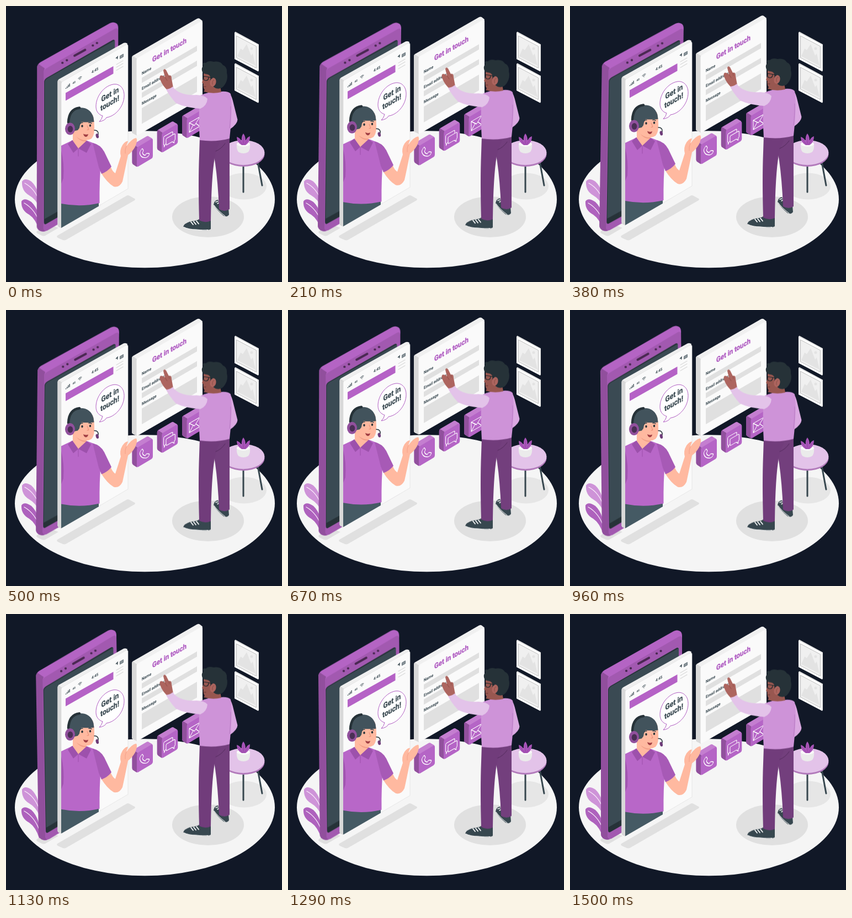
Recreate the animation shown at these times as an HTML page. Size 500 by 500 pixels, loop 1.54 s.

```html
<!DOCTYPE html>
<html lang="en">
<head>
<meta charset="utf-8">
<title>Get in touch</title>
<style>
  html, body { margin: 0; width: 100%; height: 100%; overflow: hidden; background: #111827; }
  svg { display: block; width: 100%; height: 100%; }
  text { font-family: Roboto, Arial, sans-serif; font-weight: 700; fill: #37474f; }
  .float { animation: float 1540ms linear -40ms infinite; }
  .wind { animation: wind 1540ms linear -40ms infinite; transform-origin: 130px 220px; }
  .line { fill: none; stroke-linecap: round; stroke-linejoin: round; }
  @keyframes float {
    0%, 100% { transform: translateY(.5px); }
    50% { transform: translateY(-9.5px); }
  }
  @keyframes wind {
    0%, 100% { transform: rotate(0deg); }
    25% { transform: rotate(1deg); }
    75% { transform: rotate(-1deg); }
  }
</style>
</head>
<body>
<svg viewBox="0 0 500 500">
  <defs>
    <g id="picture">
      <path d="M414 48l1.500-1.500L458 69.500V117l-1 1.500-43-22.500z" fill="#e0e0e0"/>
      <path d="M414 48l43 22.500v48L414 96z" fill="#fff"/>
      <path d="M417.500 54l36 19v39.500l-36-19z" fill="#f0f0f0" stroke="#a6a6a6" stroke-width=".7"/>
      <path d="M419 91l6-14 4 3 7-11 8 21 3-4 5 22z" fill="#e3e3e3"/>
      <circle cx="445" cy="77" r="2.500" fill="#e3e3e3"/>
    </g>
    <g id="tile">
      <path d="M228.500 254.500q0-3 2.500-4.500L254 236.500q3-2 5 0l6 3.500-28 51-6-3.500q-2.500-1.500-2.500-4z" fill="#c47ed0"/>
      <path d="M228.500 254.500q0-3 1.500-4l8 5-1 36-6-4q-2.500-1.500-2.500-4z" fill="#91509d"/>
      <path d="M237 259.500q0-3 2.500-4.500L263 241q3-1.500 3 2V272q0 3-2.500 4.500L240 290.500q-3 2-3-1.500z" fill="#b565c6"/>
    </g>
    <clipPath id="screen"><path d="M100 138L221 68V332L100 402z"/></clipPath>
  </defs>

  <rect width="500" height="500" fill="#111827"/>
  <ellipse cx="251.500" cy="350.300" rx="235.500" ry="124" fill="#f5f5f5"/>
  <g fill="#e0e0e0">
    <path d="M56 408q-2 2 1 4l8 4q3 1 6 0l24-14-20-8z"/>
    <path d="M93 416q-2 2 1 4l9 4q3 1 6-.5L233 352q2-2 0-3l-9-5q-3-2-6 0z"/>
    <ellipse cx="366" cy="382" rx="65" ry="37"/>
    <ellipse cx="431" cy="326.500" rx="41" ry="24" fill="#e6e6e6"/>
  </g>

  <use href="#picture"/>
  <use href="#picture" y="57"/>

  <!-- plant -->
  <path d="M62 364Q61 332 46 318Q34 310 29 318Q28 335 42 343Q54 350 60 364z" fill="#ce93d8"/>
  <path d="M63 406Q62 370 46 355Q33 346 28 354Q27 370 42 378Q54 386 60 406z" fill="#ae62bd"/>
  <path class="line" d="M34 321Q53 331 61 356M33 357Q53 368 62 396" stroke="#faf0fb" stroke-width="1.200"/>

  <!-- table -->
  <path class="line" d="M430 288V337M456 282L464 325" stroke="#37474f" stroke-width="3"/>
  <ellipse cx="430" cy="268.500" rx="38.500" ry="22.500" fill="#b27abb"/>
  <ellipse cx="430" cy="265.500" rx="38.500" ry="22.500" fill="#e3c3e9"/>
  <path d="M418 250q-1 11 4 15 8 4 16 0 5-4 4-15z" fill="#ebebeb"/>
  <ellipse cx="430" cy="250" rx="12" ry="4.500" fill="#fafafa"/>
  <path d="M427 252Q418 247 418 237Q424 239 427 245Q426 236 430 231Q434 236 434 244Q437 237 442 236Q442 247 434 252z" fill="#a954b9"/>
  <path class="line" d="M430 251V237M428 251L421 241M432 251L439 241" stroke="#8b4698" stroke-width=".7"/>

  <!-- phone -->
  <g class="wind">
    <path d="M56 113Q56 106 62 102L188 31Q194 28 199 31Q203 33 203 40V332L72 408Q66 410 61 407Q56 404 56 398z" fill="#b464c4"/>
    <path d="M56 113Q56 108 59 105.500L70 113Q68 117 68 122V400Q68 406 72 408Q66 410 61 407Q56 404 56 398z" fill="#914f9d"/>
    <path d="M68 122Q68 116 73 113L197 41Q203 38 203 46V332L75 407Q68 409 68 400z" fill="#a259b0"/>
    <path d="M69 138Q69 133 74 130L192 62Q197 59 197 65V324L73 395Q69 397 69 391z" fill="#263238"/>
    <path d="M70 139Q70 134 75 131L197 62V314L70 386z" fill="#3a4a53"/>
    <g class="line" stroke="#4a2852" stroke-width="4.200">
      <path d="M102 103h.1M110 98.300h.1M124 90L143 79.500M157 71.500h.1M164.500 67h.1"/>
    </g>
  </g>

  <!-- contact form -->
  <g class="float">
    <path d="M228 94q0-3 2.500-4.500L346 23q3-1.500 5 0l5 4-119 207-7-3q-2-1-2-3z" fill="#f0f0f0"/>
    <path d="M228 94q0-2.500 1.500-4l8.500 6-1 138.500-7-3.500q-2-1-2-3z" fill="#d9d9d9"/>
    <path d="M236.500 98q0-2.500 2-4L353 28q3-1.500 3 2V164q0 2-2 3.500L239.500 233.500q-3 1.500-3-1.500z" fill="#fafafa"/>
    <g fill="#e0e0e0">
      <path d="M246 130l100-58v9.500l-100 58z"/>
      <path d="M246 157l100-58v9.500l-100 58z"/>
      <path d="M246 185l100-58v28.500l-100 58z"/>
    </g>
    <text transform="matrix(.866 -.5 0 1 265 102)" font-size="13.200" style="fill:#b05cc2;stroke:#b05cc2;stroke-width:.35">Get in touch</text>
    <g font-size="7.500">
      <text transform="matrix(.866 -.5 0 1 246 125)">Name</text>
      <text transform="matrix(.866 -.5 0 1 246 152.500)">Email address</text>
      <text transform="matrix(.866 -.5 0 1 246 179.500)">Message</text>
    </g>

    <use href="#tile"/>
    <use href="#tile" x="45.300" y="-26.200"/>
    <use href="#tile" x="90.500" y="-52.300"/>
    <g class="line" stroke="#fff" stroke-width="1.200">
      <path transform="matrix(.866 -.5 0 1 251.500 266)" d="M-8-9q-3 2-2.500 5Q-8 6 3 10q4 1 6-2 1-2-1-3l-4-2q-2 0-3 2Q-4 2-5-3q2-1 2-3l-2-4q-1-1-3 1z"/>
      <g transform="matrix(.866 -.5 0 1 296 241)">
        <path d="M-7 5l-1 0 -3 4V5q-1 0-1-2V-8q0-2 2-2H5q2 0 2 2v3"/>
        <path d="M-5-4H10q2 0 2 2V6q0 2-2 2v4L6 8H-5q-2 0-2-2V-2q0-2 2-2z"/>
      </g>
      <path transform="matrix(.866 -.5 0 1 341.500 214.500)" d="M-11-8H11V9H-11zL0 2 11-8M-11 9L-3 0M11 9L3 0"/>
    </g>
  </g>

  <!-- front screen -->
  <g class="float">
    <path d="M93.500 137q0-3 2.500-4.500L213 67q4-1.500 7 1l-119 334-5-2q-2.500-1-2.500-3z" fill="#efefef"/>
    <path d="M93.500 137q0-2.500 1.500-3.500l6.500 4-1.500 265-4-2q-2.500-1-2.500-3z" fill="#d9d9d9"/>
    <path d="M100 141q0-2.500 2-4L217 70.500q4-2 4 2V331L100 402z" fill="#fafafa" stroke="#dcdcdc" stroke-width=".6"/>

    <g class="line" stroke="#37474f" stroke-width="1.300">
      <path d="M108.500 150v-1.500M110.700 148.700v-3M112.900 147.400v-4.500M115.100 146v-5.500" stroke-linecap="butt"/>
      <path d="M131 131.500q3-4.500 6-3.500M132.300 132.500q2-2.500 3.500-2M134 133.500h.1" stroke-width="1"/>
    </g>
    <path d="M198 95l5-5-1 7-1.500-2.500z" fill="#37474f"/>
    <path d="M206.500 90.500l6-3.500v5l-6 3.500z" fill="#8a949a" stroke="#37474f" stroke-width=".6"/>
    <text transform="matrix(.866 -.5 0 1 120.500 142)" font-size="5">4G</text>
    <text transform="matrix(.866 -.5 0 1 155 122.500)" font-size="7">4:45</text>
    <path class="line" d="M200 106l12-7M200 111l12-7M200 116.500l12-7" stroke="#dadada" stroke-width="1.300"/>
    <path d="M108 157.500L194.500 109v13.500L108 171.500z" fill="#b562c6"/>

    <path d="M175 199Q174 205 169 209.500Q179 208 182 202C198 200 214 182 214 162C214 148 205 140 194 142C177 145 163 164 163 182C163 191 168 197 175 199z" fill="#fff" stroke="#b05cc2" stroke-width="1"/>
    <g font-size="14" stroke="#37474f" stroke-width=".25">
      <text transform="matrix(.866 -.5 0 1 172.500 174)">Get in</text>
      <text transform="matrix(.866 -.5 0 1 171 190.500)">touch!</text>
    </g>

    <!-- operator -->
    <g clip-path="url(#screen)">
      <path d="M100 354H168V402H100z" fill="#455a64"/>
      <path d="M100 253L121 243L133 254L147 244L160 249Q173 255 172 285Q169 315 169.500 357Q135 365 100 358z" fill="#b867c8"/>
      <path d="M100 262Q106 285 104 312L100 322z" fill="#a155b0"/>
    </g>
    <path d="M172 302L190 292Q193 300 198 303L208 272Q205 262 211 252Q217 244 221 245L218 254Q228 240 236 239Q239 243 234 255Q229 264 221 270Q215 300 211 318Q205 330 195 327Q183 320 172 302z" fill="#ffb9a0"/>
    <path class="line" d="M218 254Q215 260 216 267" stroke="#ee957e" stroke-width=".7"/>
    <path d="M157 248Q171 251 178 264L191 291Q184 300 173 304L168 292z" fill="#a75ab6"/>
    <path d="M121 224V244L131 259L146 246L145 236z" fill="#ffb9a0"/>
    <path d="M127 236Q136 244 146 243L146 245Q135 247 127 236z" fill="#f29f88"/>
    <path d="M122 195L157 197Q160 206 160 218Q161 233 155 240Q148 245 138 242Q127 239 122 230z" fill="#ffb9a0"/>
    <path d="M120 243L112 250L122 266L131 258zM146 244L131 258L146 266L154 250z" fill="#9d51ac"/>
    <path class="line" d="M131 259V272" stroke="#9d51ac" stroke-width="1"/>
    <path d="M113 211Q111 189 128 185Q152 181 158.500 202L159.500 210Q147 211 137 210Q134 213 133 221L130 225L121 227z" fill="#42535c"/>
    <path class="line" d="M113 211Q114 187 133 184.500" stroke="#263238" stroke-width="4.500"/>
    <ellipse cx="116" cy="222.500" rx="9" ry="11" fill="#91509d"/>
    <ellipse cx="116.500" cy="223" rx="4.800" ry="6" fill="#4a2f55"/>
    <g fill="#263238">
      <ellipse cx="138" cy="217.500" rx="1.700" ry="2.200"/>
      <ellipse cx="152.500" cy="216.500" rx="1.700" ry="2.200"/>
    </g>
    <path class="line" d="M134 213.500q3-3 5-2M150 211.500q3-1 5 1" stroke="#37474f" stroke-width="1.500"/>
    <path class="line" d="M147 217l3 7-3 .5" stroke="#e98b73" stroke-width="1"/>
    <path d="M140 231.500Q144 234 149 232Q148 237.500 144 237Q141 236 140 231.500z" fill="#a23f44"/>
    <path class="line" d="M160 225Q168 225 167 233" stroke="#263238" stroke-width="1.500"/>
    <ellipse cx="165.200" cy="235.500" rx="2.600" ry="4.200" transform="rotate(-15 165 235)" fill="#6e3c79"/>
  </g>

  <!-- visitor -->
  <g class="float">
    <path d="M384 351Q377 352 376 360Q382 370 394 380Q401 383 404 378L403 366L387 358z" fill="#37474f"/>
    <path class="line" d="M377 361Q384 371 397 380.500" stroke="#fff" stroke-width="1"/>
    <path class="line" d="M380 355l4-1M383 358l4-2" stroke="#fff" stroke-width="1.500"/>
    <path d="M350 386Q346 389 335 390Q322 394 321 400Q330 405 345 405Q365 408 371 404L371 388z" fill="#37474f"/>
    <path class="line" d="M322 400.500Q331 405 345 405Q358 406.500 366 405.500" stroke="#fff" stroke-width="1"/>
    <path class="line" d="M335 391l4 5M340 390.500l4 5M345 389.500l4 5" stroke="#fff" stroke-width="1.800"/>
    <path d="M372 243L405 238Q405 270 405 368Q396 374 386 368Q384 320 379 285z" fill="#733f7d"/>
    <path d="M351 240L388 245Q381 258 378 275Q372 310 371 389Q360 394 350 388Q348 320 350 270z" fill="#713c7b"/>
    <path class="line" d="M380 263Q390 259 397 249" stroke="#552b5e" stroke-width="1"/>
    <path d="M404 157Q409 161 413 180L419.500 206Q419 214 406 223L402 205z" fill="#dba9e2"/>
    <path d="M352 162Q368 154 390 155Q402 154 407 159Q411 185 405 240Q380 247 351 243Q349 210 350 183z" fill="#ce93d8"/>
    <path class="line" d="M407 182Q407 205 405 221" stroke="#b477bf" stroke-width=".8"/>
    <path d="M293 153Q284 145 280 135Q277 128 280 126Q283 125 288 129L285 117Q286 112 290 116L295 126Q300 124 300 132L303 148z" fill="#ad655f"/>
    <path class="line" d="M288 129l4 6M295 126l1 5" stroke="#854840" stroke-width=".7"/>
    <path d="M290 151Q298 150 302 146Q314 163 345 161Q361 162 365 168Q364 181 352 186Q325 184 308 176Q296 163 290 151z" fill="#e3c3e9"/>
    <path d="M358 118L373 120L388 145L390 156Q374 160 358 155Q361 152 359 150.500Q357 147 357.500 141L355 138.500L358 130z" fill="#985750"/>
    <path d="M357 122Q352 113 358 108Q354 102 362 103Q367 98 376 101Q388 99 393 107Q401 110 400 121Q403 133 396 143Q390 152 380 149Q372 145 370 134Q372 127 366 124z" fill="#263238"/>
    <ellipse cx="375" cy="138" rx="5.500" ry="8" transform="rotate(12 375 138)" fill="#ad655f"/>
    <path class="line" d="M377 134q-4 1-3 8" stroke="#7d4a41" stroke-width=".8"/>
    <path class="line" d="M357 127l12 2 4 2M358 128q-1 7 4 7 5 0 5-6" stroke="#1c262b" stroke-width="1.200"/>
    <path class="line" d="M358 146h4" stroke="#5a302b" stroke-width=".9"/>
  </g>
</svg>
</body>
</html>
```
